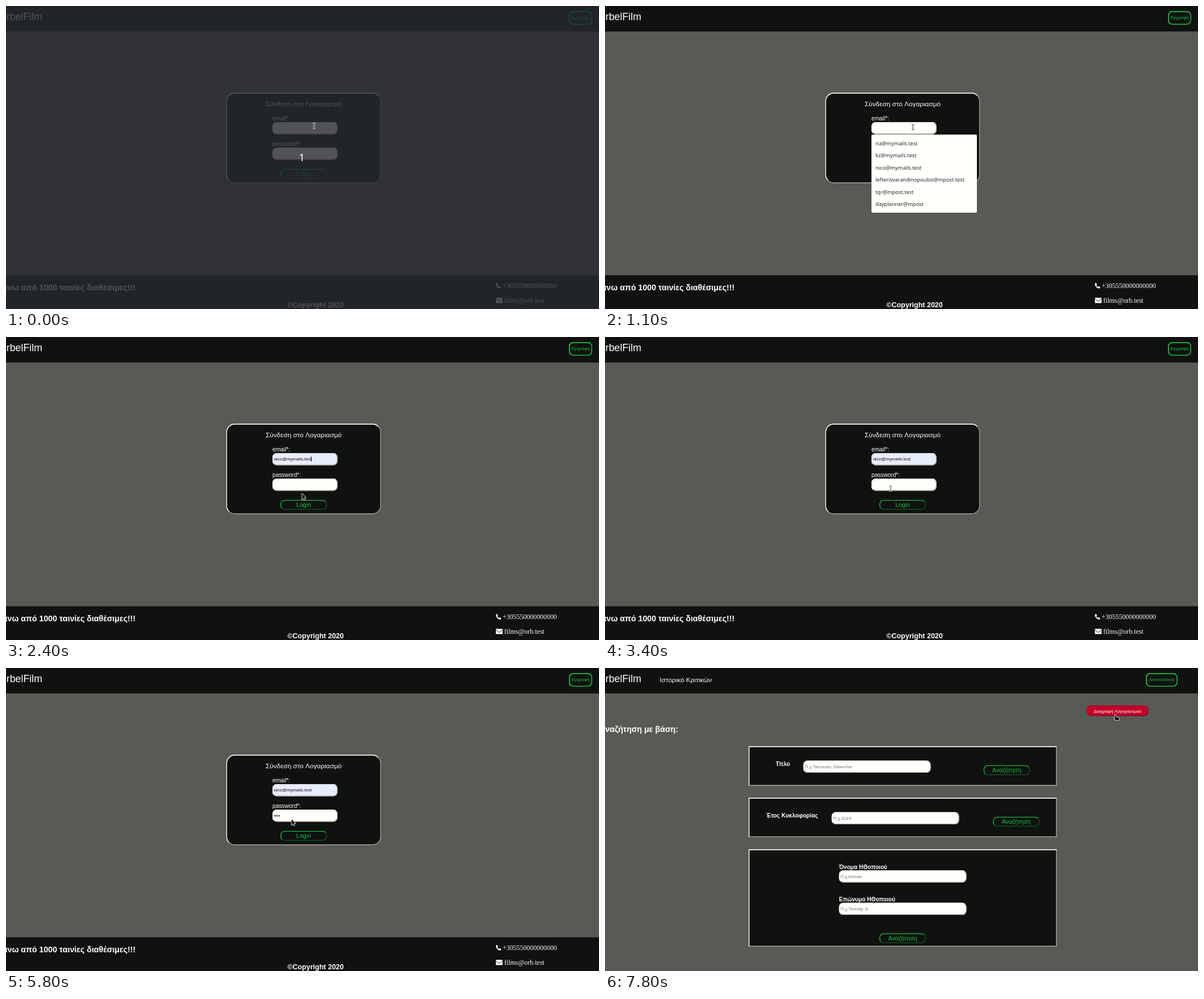
These frames come from a looping animation (1046 px wide and 535 px high, 8000 ms). An HTML page with a canvas:

```html
<!DOCTYPE html>
<html lang="el">
<head>
<meta charset="utf-8">
<title>Σύνδεση</title>
<style>
html, body { margin: 0; width: 100%; height: 100%; overflow: hidden; background: #595955; }
canvas { display: block; }
</style>
</head>
<body>
<canvas id="stage" width="1046" height="535"></canvas>
<script>
const ctx = document.getElementById('stage').getContext('2d');
const W = 1046, H = 535, LOOP = 8000, STEP = 100;

const SANS = '"Liberation Sans", Arial, sans-serif';
const SERIF = '"Liberation Serif", Times, serif';
const MENU = '"Noto Sans", "Open Sans", sans-serif';

const PAGE = '#595955', DARK = '#0f120f', WHITE = '#fffffc', SHADE = '#a9aaa7';
const GREEN = '#1fbb46', DARK_GREEN = '#0e5a25', AUTOFILL = '#e8edfb';

const EMAILS = [
  'ria@mymails.test', 'kz@mymails.test', 'nico@mymails.test',
  'lefterisvarandinopoulos@mpost.test', 'tqr@mpost.test', 'dayplanner@mpost'
];
const MENU_TOP = 232, ROW = 21.4;

// Pointer: first step, last step, target x, target y
const START = [543.5, 211.5];
const MOVES = [
  [1100, 1900, 532.5, 282.5],
  [2300, 2700, 504, 267.5],
  [7000, 7400, 892.5, 92.5],
  [7700, 7800, 901, 83]
];
const KEYS = [3700, 4100, 4600, 4900];

const PHONE = new Path2D('M.3 1Q1.5 0 2.4 .1L3.9 3 2.6 4.2Q3.6 6.2 5.4 7L6.7 5.8 9.4 7.3Q9.4 9 8.3 9.6Q5.6 10.3 2.6 7.2Q-.5 4 .3 1Z');
const ARROW = new Path2D('M0 0V10L2.2 7.9 3.7 11.3 5.2 10.6 3.8 7.3H6.8Z');
const HAND = new Path2D('M2.4 0Q3.5 0 3.5 1.1V4L7.6 4.9Q9 5.2 8.8 6.6L8.2 9.8H3L.3 6.3Q-.2 5.3 .8 5L1.4 5.4V1.1Q1.4 0 2.4 0Z');
const BEAM = new Path2D('M-2.2 -4.6Q0 -4.6 0 -3.6Q0 -4.6 2.2 -4.6M0 -3.8V3.8M-2.2 4.6Q0 4.6 0 3.6Q0 4.6 2.2 4.6');

function text(str, x, y, size, color = WHITE, align = 'left', weight = 400, family = SANS) {
  ctx.font = `${weight} ${size}px ${family}`;
  ctx.textAlign = align;
  ctx.fillStyle = color;
  ctx.fillText(str, x, y);
}

const bold = (str, x, y, size, align) => text(str, x, y, size, WHITE, align, 700);

function rect(x, y, w, h, color) {
  ctx.fillStyle = color;
  ctx.fillRect(x, y, w, h);
}

function round(x, y, w, h, r) {
  ctx.beginPath();
  ctx.roundRect(x, y, w, h, r);
}

// Box with an outset border: light on top and left, shaded on bottom and right
function outset(x, y, w, h, r, fill, light, shade, line = 1.3) {
  const edge = color => {
    round(x + line / 2, y + line / 2, w - line, h - line, Math.max(0, r - line / 2));
    ctx.strokeStyle = color;
    ctx.lineWidth = line;
    ctx.stroke();
  };
  round(x, y, w, h, r);
  ctx.fillStyle = fill;
  ctx.fill();
  edge(shade);
  ctx.save();
  ctx.beginPath();
  ctx.moveTo(x, y);
  ctx.lineTo(x + w, y);
  ctx.lineTo(x + w - h / 2, y + h / 2);
  ctx.lineTo(x + h / 2, y + h / 2);
  ctx.lineTo(x, y + h);
  ctx.clip();
  edge(light);
  ctx.restore();
}

function field(x, y, w, value, color = '#111', fill = WHITE) {
  outset(x, y, w, 21.5, 7.5, fill, fill, SHADE);
  text(value, x + 2.4, y + 13.2, 7.95, color);
}

function button(x, y, label) {
  outset(x, y, 82, 17.3, 7.5, DARK, GREEN, DARK_GREEN);
  text(label, x + 41, y + 12.2, 10.6, GREEN, 'center');
}

function navButton(x, w, label) {
  outset(x, 9, w, 24, 8, DARK, GREEN, GREEN, 1.5);
  text(label, x + w / 2, 23.3, 7.95, GREEN, 'center');
}

function header() {
  rect(0, 0, W, H, PAGE);
  rect(0, 0, W, 45, DARK);
  text('OrbelFilm', 64, 25, 17.8, WHITE, 'right');
}

function icon(path, x, y) {
  ctx.save();
  ctx.translate(x, y);
  ctx.fillStyle = WHITE;
  ctx.fill(path);
  ctx.restore();
}

function footer() {
  rect(0, 475.5, W, 60, DARK);
  bold('Πάνω από 1000 ταινίες διαθέσιμες!!!', 228.5, 501.7, 14.2, 'right');
  bold('©Copyright 2020', 546, 532, 12.5, 'center');
  icon(PHONE, 864, 489);
  text('+305550000000000', 876, 498, 11.88, WHITE, 'left', 400, SERIF);
  round(864, 515.3, 12, 9.2, 1.2);
  ctx.fillStyle = WHITE;
  ctx.fill();
  ctx.beginPath();
  ctx.moveTo(864, 517.4);
  ctx.lineTo(870, 521.6);
  ctx.lineTo(876, 517.4);
  ctx.strokeStyle = DARK;
  ctx.lineWidth = 0.9;
  ctx.stroke();
  text('films@orb.test', 879, 524, 11.88, WHITE, 'left', 400, SERIF);
}

const caret = (x, y) => rect(Math.round(x), y, 1, 9, '#111');

function menu(hover) {
  ctx.save();
  ctx.shadowColor = 'rgba(0,0,0,.35)';
  ctx.shadowBlur = 2;
  round(470, 227, 186, 138, 2);
  ctx.fillStyle = WHITE;
  ctx.fill();
  ctx.restore();
  if (hover >= 0) rect(470, MENU_TOP + hover * ROW, 186, ROW, '#c5c6c3');
  EMAILS.forEach((mail, i) =>
    text(mail, 477, 246 + i * ROW, 9.2, '#262a28', 'left', 500, MENU));
}

function login(t, pointer) {
  const open = t >= 600 && t < 2300;
  const hover = open && pointer.y >= MENU_TOP ? Math.floor((pointer.y - MENU_TOP) / ROW) : -1;
  const mail = t >= 2300 ? EMAILS[2] : hover >= 0 ? EMAILS[hover] : '';
  const typed = KEYS.filter(k => t >= k).length;

  header();
  navButton(993, 41, 'Εγγραφή');
  footer();
  outset(388.5, 153, 273, 160, 15, DARK, WHITE, SHADE, 1.4);
  text('Σύνδεση στο Λογαριασμό', 525, 177.2, 11.8, WHITE, 'center');
  text('email*:', 470, 202, 10.15);
  field(470, 205, 114.8, mail, '#111', mail ? AUTOFILL : WHITE);
  text('password*:', 470, 247.3, 10.15);
  field(470, 250, 114.8, '•'.repeat(typed));
  button(484, 287.7, 'Login');

  if (t >= 500 && t < 1100) caret(472, 211);
  if (t >= 2300 && t < 2900) caret(538, 211);
  if ((t >= 2900 && t < 3400) || (t >= 3700 && t < 5500)) caret(472 + typed * 3, 256);
  if (open) menu(hover);

  if (t < 100) {
    rect(0, 0, W, H, 'rgba(38,41,48,.8)');
    text('1', 522, 274, 18, '#fff', 'center', 400, MENU);
  }
}

function panel(y, h) {
  outset(253.3, y, 543.7, h, 0, DARK, WHITE, SHADE, 1.4);
}

function search(t) {
  const red = t >= 7800 ? '#c3002b' : '#e6002e';
  const hint = (x, y, value) => field(x, y, 224.8, 'Π.χ ' + value, '#757575');

  header();
  text('Ιστορικό Κριτικών', 96.5, 25.2, 11.8);
  navButton(954, 56, 'Αποσύνδεση');
  outset(849.5, 66.5, 108.8, 18, 7.5, red, red, '#80001c');
  text('Διαγραφή Λογαριασμού', 904, 78.6, 7.95, WHITE, 'center');
  bold('Αναζήτηση με βάση:', 129, 113, 14.2, 'right');

  panel(138, 70);
  bold('Τίτλο', 301, 172.6, 10.15);
  hint(349.8, 163.5, 'Tarvonas: Dawnrise');
  button(667.7, 171.8, 'Αναζήτηση');

  panel(229, 69.7);
  bold('Έτος Κυκλοφορίας', 284, 263.5, 10.15);
  hint(399.8, 254.5, '2019');
  button(684.3, 262.7, 'Αναζήτηση');

  panel(320, 172);
  bold('Όνομα ΗΘοποιού', 412.7, 354.5, 10.15);
  hint(412.8, 357.3, 'Kelvan');
  bold('Επώνυμο ΗΘοποιού', 412.7, 412, 10.15);
  hint(412.8, 414.6, 'Tormay Jr.');
  button(484, 468.5, 'Αναζήτηση');
}

function pointerAt(t) {
  let [x, y] = START;
  for (const [from, to, tx, ty] of MOVES) {
    if (t < from) break;
    const p = Math.min(1, (t - from + STEP) / (to - from + STEP));
    const e = p * p * (3 - 2 * p);
    x += (tx - x) * e;
    y += (ty - y) * e;
  }
  return { x, y, kind: pointerKind(t, y) };
}

function pointerKind(t, y) {
  if (t >= 7800) return 'hand';
  if (t >= 5800) return t >= 6100 && t < 7000 ? 'beam' : 'arrow';
  const overField = (y > 205 && y < 226.5) || (t >= 2300 && y > 250 && y < 271.5);
  return overField ? 'beam' : 'arrow';
}

function drawPointer({ x, y, kind }) {
  ctx.save();
  ctx.lineJoin = 'round';
  if (kind === 'beam') {
    ctx.translate(x, y);
    ctx.strokeStyle = '#fff';
    ctx.lineWidth = 2.2;
    ctx.stroke(BEAM);
    ctx.strokeStyle = '#222';
    ctx.lineWidth = 0.9;
    ctx.stroke(BEAM);
  } else {
    const hand = kind === 'hand';
    ctx.translate(hand ? x - 3 : x - 0.3, y - 0.6);
    const shape = hand ? HAND : ARROW;
    ctx.strokeStyle = '#fff';
    ctx.lineWidth = 1.5;
    ctx.stroke(shape);
    ctx.fillStyle = '#111';
    ctx.fill(shape);
  }
  ctx.restore();
}

function frame() {
  const t = Math.floor((performance.now() % LOOP) / STEP) * STEP;
  const pointer = pointerAt(t);
  if (t < 5900) login(t, pointer);
  else search(t);
  drawPointer(pointer);
  requestAnimationFrame(frame);
}
frame();
</script>
</body>
</html>
```
